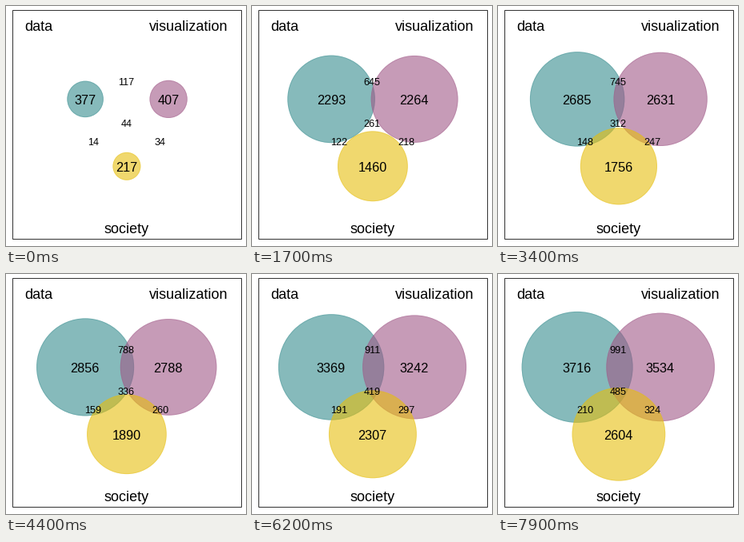
A matplotlib script that plays this animation: 300 px wide and 300 px high, repeating every 8 s.

```python
import numpy as np
import matplotlib.pyplot as plt
from matplotlib.animation import FuncAnimation
from matplotlib.patches import Circle, Rectangle

SIZE, DPI = 300, 100
FRAMES, INTERVAL = 80, 100
PX = 72 / DPI

plt.rcParams["font.family"] = "Liberation Sans"


def total(t):
    """Size of the "data" set: a fast start, then steady growth with a slow swell."""
    trend = 1908.48 + 22.88 * t
    start = 1471.52 * np.exp(-t / 4.9055)
    swell = 60 * np.sin(2 * np.pi * (t - 11.5) / 45)
    return trend - start + swell


KEYS = total(np.array([0, 6, 34, 79]))


def curve(*counts):
    """Cubic that gives a count from the total, through its four key values."""
    return np.poly1d(np.polyfit(KEYS / 1000, counts, 3))


SETS = [
    # x, y, colour, count
    (99.1, 116.4, "#358C8E", curve(*KEYS)),
    (203.1, 116.4, "#A05887", curve(407, 1568, 2631, 3534)),
    (150.9, 200.3, "#E6BE0D", curve(217, 953, 1756, 2604)),
]
OVERLAPS = [
    # x, baseline, count
    (150.3, 99, curve(117, 453, 745, 991)),
    (150.3, 151, curve(44, 178, 312, 485)),
    (108.9, 174, curve(14, 76, 148, 210)),
    (192.6, 174, curve(34, 159, 247, 324)),
]
TITLES = [(41, 31, "data"), (228.2, 31, "visualization"), (150.8, 284, "society")]

fig = plt.figure(figsize=(SIZE / DPI, SIZE / DPI), dpi=DPI, facecolor="white")
ax = fig.add_axes([0, 0, 1, 1])
ax.set_xlim(0, SIZE)
ax.set_ylim(SIZE, 0)
ax.axis("off")


def label(x, y, text, px):
    return ax.text(x, y, text, fontsize=px * PX, color="black",
                   ha="center", va="baseline", zorder=5)


ax.add_patch(Rectangle((8, 5), 286, 286, fill=False,
                       edgecolor="#333333", linewidth=PX))
for x, y, text in TITLES:
    label(x, y, text, 18)

discs, numbers = [], []
for x, y, colour, count in SETS:
    disc = Circle((x, y), 1, facecolor=colour, edgecolor="none", alpha=0.6, zorder=2)
    rim = Circle((x, y), 1, fill=False, edgecolor=colour, alpha=0.3,
                 linewidth=PX, zorder=2)
    discs.append((ax.add_patch(disc), ax.add_patch(rim), count))
    numbers.append((label(x - 0.3, y + 7, "", 16.2), count))
for x, y, count in OVERLAPS:
    numbers.append((label(x, y, "", 12.6), count))


def update(frame):
    size = total(frame) / 1000
    for disc, rim, count in discs:
        radius = 0.9 + 1.125 * np.sqrt(count(size))
        disc.set_radius(radius)
        rim.set_radius(radius - 0.5)
    for text, count in numbers:
        text.set_text(f"{count(size):.0f}")


anim = FuncAnimation(fig, update, frames=FRAMES, interval=INTERVAL,
                     repeat=True, repeat_delay=0)
plt.show()
```
